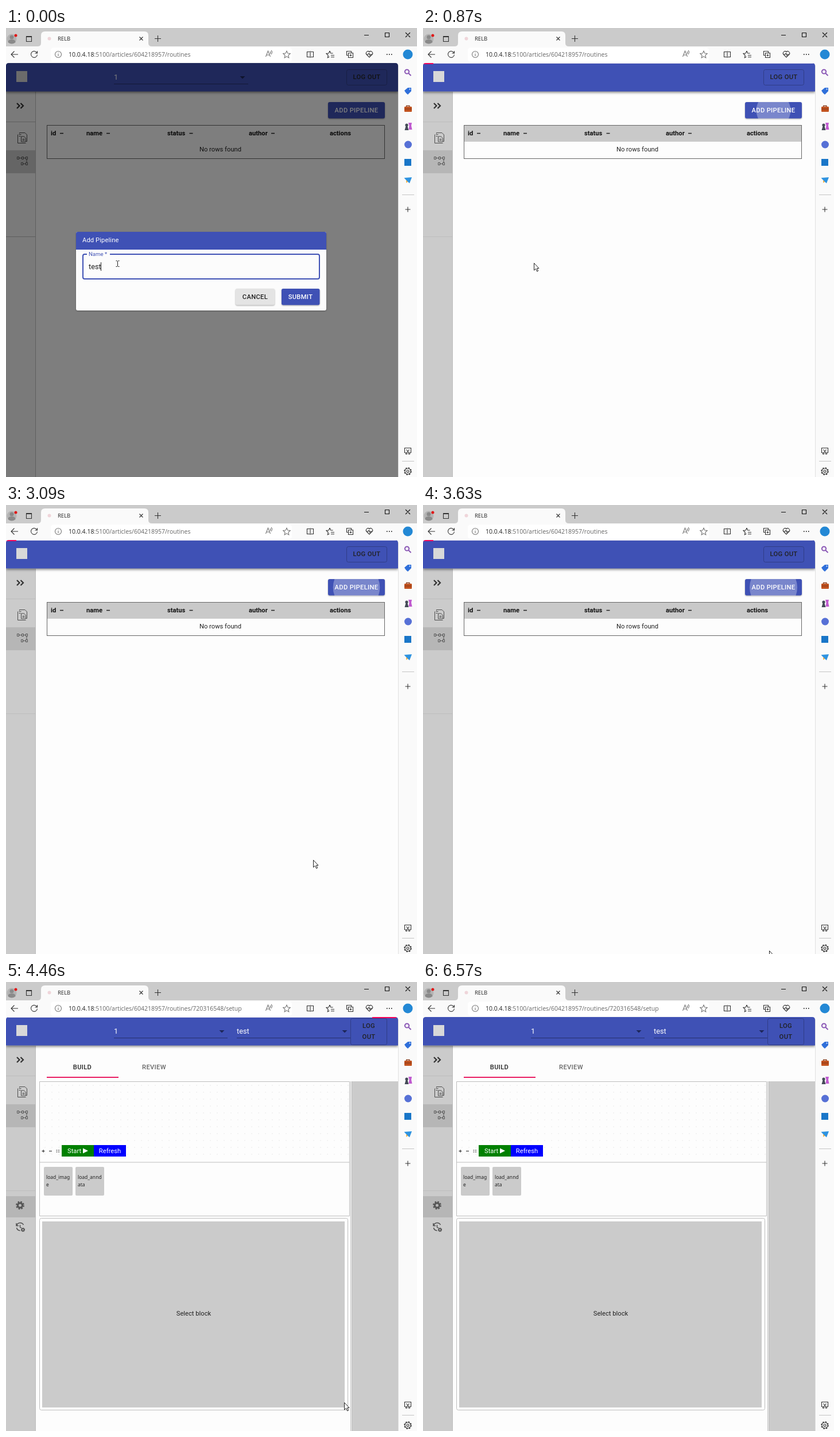
Recreate the animation shown at these times as an HTML page. Size 716x782 px, loop 7.12 s.

```html
<!DOCTYPE html>
<html lang="en">
<head>
<meta charset="utf-8">
<title>Add pipeline</title>
<style>
  html, body { margin: 0; width: 100%; height: 100%; overflow: hidden; background: #fafafa; }
  svg { display: block; }
  text { font: 11.2px Roboto, sans-serif; fill: #212121; white-space: pre; }
  .chrome { font: 10.5px "Open Sans", sans-serif; }
  .button { font-weight: 500; letter-spacing: .32px; }
  .mid { text-anchor: middle; }
  .white { fill: #fff; }
  .head text { font-weight: 700; fill: #111; }
  .field { font-size: 12.8px; }
  .small { font: 8.5px "Noto Sans", sans-serif; }
  .line { fill: none; stroke: #333; stroke-width: 1.1; }
  .rule { fill: none; stroke: #bdbdbd; }
  .raised { filter: drop-shadow(0 1.5px 1.2px #0005); }
</style>
</head>
<body>
<svg width="716" height="782" viewBox="0 0 716 782">
  <defs>
    <g id="gear">
      <circle r="4" fill="none" stroke-width="3"/>
      <circle r="6.2" fill="none" stroke-width="2.4" stroke-dasharray="2.7 2.17"/>
    </g>
    <path id="underline" d="M0 97.5H198" stroke="#26316d"/>
    <path id="arrow" d="M-4.5 -2h9l-4.5 4.5z" fill="#1d2659"/>
    <pattern id="dots" x="62" y="174" width="12" height="12" patternUnits="userSpaceOnUse">
      <rect x="5.5" y="5.5" width="1" height="1" fill="#d2d2d2"/>
    </pattern>
    <clipPath id="addClip"><rect x="561" y="129" width="99" height="29" rx="3"/></clipPath>
    <clipPath id="pageClip"><path d="M0 782V66q0-5 5-5H678q5 0 5 5V782z"/></clipPath>
  </defs>

  <!-- browser frame -->
  <rect width="716" height="782" fill="#fafafa"/>
  <rect width="716" height="32" fill="#cbcbcb"/>
  <path d="M55 32q6 0 6-6V13q0-7 7-7H241q7 0 7 7V26q0 6 6 6z" fill="#fafafa"/>
  <rect x="78" y="34" width="420" height="25" rx="5" fill="#fff"/>
  <path d="M683.5 65V782" stroke="#e0e0e0"/>
  <g fill="#8a8a8a">
    <circle cx="10" cy="19" r="8.5" fill="#b3b3b3"/>
    <circle cx="10" cy="16" r="3.5"/><path d="M3.5 25q0-5 6.5-5t6.5 5q-6.5 5-13 0"/>
    <circle cx="17" cy="13" r="2.5" fill="#e01818"/>
  </g>
  <circle cx="75.5" cy="18.5" r="3" fill="#efd5da"/>
  <text class="chrome" x="90" y="22" style="font-size:9.5px">RELB</text>
  <text class="chrome" x="109" y="50">10.0.4.18<tspan id="path" fill="#666"></tspan></text>
  <g class="line">
    <path d="M35.5 14.5h9v9h-9zM35 15.5h10M232.5 15.5l6 6m0-6l-6 6M259 18.5h11M264.5 13v11"/>
    <path d="M624 12.5h8M660.5 8.5h7v7h-7zM696 8l8 8m0-8l-8 8" stroke="#111"/>
    <path d="M21 46H9M14.5 40.5L9 46l5.5 5.5M54 43.5a5.5 5.5 0 1 0 .5 3M54.5 40v4h-4"/>
    <g stroke="#777"><circle cx="91" cy="46" r="5.5"/><path d="M91 45v4M91 42.5v1"/>
      <path d="M452.5 50l4-10 4 10M454 47h5M460 41q2 2 0 4M462 39q3 3 0 7"/>
      <path d="M489 40l1.8 4 4.4.5-3.3 3 .9 4.3-3.8-2.2-3.8 2.2.9-4.3-3.3-3 4.4-.5z"/></g>
    <path d="M529 41.5h-4.5v9h4.5M531 41.5h4.5v9h-4.5M530 40v12"/>
    <path d="M564 40l1.7 4h4M564 40l-1.8 4-4.2.5 3.2 3-.8 4.2 3-1.7M566 47.5h6M566 50.5h6"/>
    <path d="M601.5 43V40.500h-8v7h2.500M596.500 43.500h8v8h-8zM600.500 45.500v4M598.500 47.500h4"/>
    <path d="M633 51l-4.5-4.5a3 3 0 0 1 4.5-5 3 3 0 0 1 4.5 5zM628 46h3l1.5-2 1.5 4 1-2h3"/>
    <path d="M663 46h1.5M667 46h1.5M671 46h1.5" stroke-width="1.8"/>
  </g>
  <circle cx="700" cy="46" r="8.5" fill="#2388d5"/>

  <!-- browser side bar -->
  <g fill="none" stroke="#8a57b5" stroke-width="2"><circle cx="698.5" cy="76" r="3.6"/><path d="M701.5 79l4 4"/></g>
  <path d="M694 109l6-5h6v6l-6 6q-4-3-6-7z" fill="#2f6fda"/><circle cx="703.5" cy="106.5" r="1" fill="#fff"/>
  <path d="M697.5 138v-2.5h5.5v2.5" fill="none" stroke="#8a3d1c" stroke-width="1.3"/>
  <rect x="694" y="137" width="13" height="9" rx="1" fill="#c1521f"/><path d="M694 141h13" stroke="#7d3012"/>
  <g fill="#444b57"><circle cx="698" cy="169" r="2.6"/><path d="M696.5 171h3l2 7h-7z"/>
    <path d="M701 165h6l-1 5 1.5 7h-6l1-7z" fill="#c05ad0"/></g>
  <circle cx="700.5" cy="203" r="6.5" fill="#5670d6"/>
  <rect x="694" y="228" width="12" height="12" fill="#1976c8"/>
  <path d="M693.500 261l13.500-1-4 10.500-4-3.500z" fill="#2e93e0"/><path d="M697 265l3 2.500-2.500 2.500z" fill="#f0a52c"/>
  <path d="M690 290.5h21M690 754.5h21" stroke="#c4c4c4"/>
  <g class="line">
    <path d="M695.5 316h9M700 311.5v9"/>
    <path d="M696 739.5h-1.5v-8h11v8h-1.5M697.5 734l4.500 6M702.500 734l-4.500 6"/>
    <circle cx="697.5" cy="741" r="1.3"/><circle cx="702.5" cy="741" r="1.3"/>
    <circle cx="700" cy="772" r="5"/><circle cx="700" cy="772" r="2"/>
    <circle cx="700" cy="772" r="6" stroke-width="1.6" stroke-dasharray="2.4 2.31"/>
  </g>

  <g clip-path="url(#pageClip)">
    <rect y="61" width="683" height="721" fill="#fdfdfd"/>
    <!-- navigation -->
    <rect id="nav" y="111" width="51" height="671" fill="#cbcbcb"/>
    <rect id="navItem" y="213" width="51" height="40" fill="#b6b6b6"/>
    <path class="rule" d="M51.5 111V782M0 163.5H51M0 363.5H51" stroke="#b5b5b5"/>
    <g fill="none" stroke="#4d4d4d">
      <path d="M19 131l4.5 4.5-4.5 4.5M25.5 131l4.5 4.5-4.5 4.5" stroke="#333" stroke-width="2.2"/>
      <path d="M23.500 184V182.500h9.500l3.500 3.500v11.500h-1.500M20.500 185.500V200.500h14M22.500 185.500h4M22.500 188.500h3M26.500 198v-9h5l3 3v6zM28.500 193.500h4M28.500 195.500h4"/>
      <path d="M19.5 224.5h3v4h-3zM27.500 224.500h3v4h-3zM34.500 224.5h3v4h-3zM26.5 234.5h3v4h-3zM34.5 234.5h3v4h-3zM22.5 226.5h5M30.5 226.5h4M36 228.5v6M29.5 236.5h5" stroke-width=".9"/>
    </g>

    <!-- header -->
    <rect y="61" width="683" height="49.5" fill="#3f51b5" style="filter:drop-shadow(0 2px 2px #0007)"/>
    <rect x="18" y="75" width="19" height="19" fill="#d8d8d8"/>
    <g id="progress">
      <rect y="61" width="683" height="1" fill="#dcd9ec"/>
      <rect id="bar" y="61" height="2" fill="#f50057"/>
    </g>

    <g id="listPage">
      <g id="wideSelect"><path d="M188 97.5H422" stroke="#26316d"/><use href="#arrow" x="412" y="86"/>
        <text class="field white" x="188" y="90">1</text></g>
      <rect x="593.5" y="72.5" width="70" height="27" rx="3" fill="none" stroke="#303d87"/>
      <text class="button mid" x="628.5" y="89">LOG OUT</text>
      <rect class="raised" x="561" y="129" width="99" height="28.5" rx="3" fill="#3f51b5"/>
      <circle id="ripple" cx="610.5" cy="143.5" fill="#fff" opacity=".3" clip-path="url(#addClip)"/>
      <text class="button mid white" x="610.5" y="147">ADD PIPELINE</text>
      <rect id="tableHead" x="72" y="170" width="587" height="28" fill="#c9c9c9"/>
      <rect x="71.5" y="169.5" width="588" height="58" fill="none" stroke="#666"/>
      <g class="head">
        <text x="78" y="187">id</text><text x="140" y="187">name</text><text x="281" y="187">status</text>
        <text x="423" y="187">author</text><text x="564" y="187">actions</text>
        <path d="M94 183.5h6M175 183.5h6M319.5 183.5h6M462 183.5h6" stroke="#222" stroke-width="1.3"/>
      </g>
      <text class="mid" x="373.5" y="215">No rows found</text>
    </g>

    <g id="buildPage">
      <use href="#underline" x="188"/><use href="#arrow" x="376" y="86"/><text class="field white" x="188" y="90">1</text>
      <use href="#underline" x="402"/><use href="#arrow" x="590" y="86"/><text class="field white" x="402" y="90">test</text>
      <rect x="600.5" y="63.5" width="63" height="46" rx="3" fill="none" stroke="#303d87"/>
      <text class="button mid" x="632" y="80">LOG</text><text class="button mid" x="632" y="98.5">OUT</text>
      <text class="button mid" x="133" y="151.5">BUILD</text>
      <text class="button mid" x="258" y="151.5" style="fill:#666">REVIEW</text>
      <rect x="71" y="165" width="125" height="2" fill="#e91e63"/>
      <rect x="602" y="173" width="81" height="609" fill="#cbcbcb"/>
      <rect x="59" y="174" width="540" height="132" fill="url(#dots)"/>
      <path class="rule" d="M58.5 173.5H598.5V407.5H58.5zM58.5 314H598.5M602.5 173V782M600.5 173V782"/>
      <path d="M62.5 294.5h5M65 292v5M75 294.5h5M87.5 293h2M91 293h2M87.5 296h2M91 296h2" stroke="#222"/>
      <rect x="97" y="284" width="56" height="20" fill="#008000"/><rect x="153" y="284" width="56" height="20" fill="#00f"/>
      <text class="white" x="107" y="297.5">Start</text><path d="M134 289.5v9l9-4.5z" fill="#fff"/>
      <text class="white mid" x="181" y="297.5">Refresh</text>
      <rect x="66" y="322" width="50" height="50" rx="2" fill="#cbcbcb"/><rect x="121" y="322" width="50" height="50" rx="2" fill="#cbcbcb"/>
      <text class="small" x="70" y="343">load_imag<tspan x="70" dy="13">e</tspan></text>
      <text class="small" x="125" y="343">load_annd<tspan x="125" dy="13">ata</tspan></text>
      <rect class="rule" x="58.5" y="411.5" width="537" height="334" rx="3"/>
      <rect x="63" y="417" width="527" height="324" fill="#cbcbcb"/>
      <text class="mid" x="327" y="581">Select block</text>
      <rect y="373" width="51" height="37" fill="#b6b6b6"/>
      <use href="#gear" x="24.5" y="389" stroke="#555"/>
      <g fill="none" stroke="#4d4d4d" stroke-width="1.4"><path d="M18.5 424a6.5 6.5 0 0 1 12-1M18 420v4.5h4M18.5 428a6.5 6.5 0 0 0 6 5M24.5 423v4l2.5 1.5"/>
        <use href="#gear" transform="translate(29.5 431.5) scale(.5)"/></g>
    </g>

    <g id="dialog">
      <rect y="61" width="683" height="721" opacity=".5"/>
      <rect class="raised" x="122" y="355" width="436" height="137" rx="3" fill="#fcfcfc"/>
      <path d="M122 386V358q0-3 3-3H555q3 0 3 3V386z" fill="#3f51b5"/>
      <text class="white" x="133" y="373" letter-spacing=".1">Add Pipeline</text>
      <rect x="134" y="394" width="412" height="43" rx="3" fill="none" stroke="#3f51b5" stroke-width="2"/>
      <rect x="141" y="392" width="40" height="4" fill="#fcfcfc"/>
      <text x="144" y="397" style="font-size:9.6px;fill:#3f51b5">Name *</text>
      <text class="field" x="144" y="420">test</text>
      <rect id="caret" x="165" y="408" width="1" height="15" fill="#222"/>
      <rect class="raised" x="400" y="454" width="68" height="28.5" rx="3" fill="#e4e4e4"/>
      <rect class="raised" x="480" y="454" width="66.5" height="28.5" rx="3" fill="#3f51b5"/>
      <text class="button mid" x="434" y="472">CANCEL</text><text class="button mid white" x="513" y="472">SUBMIT</text>
    </g>

    <path id="beam" d="M191.5 405.5h2l1 1 1-1h2M194.5 406v9M191.5 415.5h2l1-1 1 1h2" fill="none" stroke="#222"/>
    <path id="pointer" d="M.5 .5V13l3-2.7 2.2 4.7 2-1-2.1-4.4H9z" fill="#fff" stroke="#222"/>
  </g>
</svg>
<script>
const LOOP = 7120, OPENED = 870, BUILD = 4460, LOADED = 4890;
const $ = id => document.getElementById(id);
const show = (id, on) => $(id).style.display = on ? '' : 'none';
const set = (id, attrs) => { for (const k in attrs) $(id).setAttribute(k, attrs[k]); };

// Screen refresh times while the button pulses
const ticks = [870, 990, 1260, 1380, 1540, 1690, 1810, 2090, 2240, 2370, 2520, 2670, 2820,
  2970, 3090, 3210, 3330, 3630, 3760, 3900, 4030, 4180, 4310];
// Pointer stops: time, x, y
const stops = [
  [720, 193, 409], [2090, 195, 408], [2240, 198, 350], [2370, 196, 288], [2520, 175, 288],
  [2820, 190, 291], [2970, 360, 452], [3090, 535, 618], [3210, 572, 690], [3330, 586, 720],
  [3490, 598, 739], [3630, 603, 776], [3760, 603, 800], [4460, 589, 732], [4610, 430, 645],
  [4730, 280, 556], [4890, 230, 464], [5040, 200, 410], [5160, 190, 396], [5300, 184, 381],
  [5430, 177, 371], [6010, 300, 520], [6140, 487, 704], [6290, 560, 758], [6410, 600, 780],
  [6570, 600, 800]
];

// cubic-bezier(.4, 0, .2, 1)
function ease(x) {
  let lo = 0, hi = 1;
  for (let i = 0; i < 20; i++) {
    const s = (lo + hi) / 2, q = 1 - s;
    if (1.2 * s * q * q + .6 * s * s * q + s ** 3 < x) lo = s; else hi = s;
  }
  return lo * lo * (3 - 2 * lo);
}

function rippleRadius(t) {
  if (t < 1200) return 30 + (t - OPENED) * .058;
  const phase = (t - 1200) / 1250, e = ease(phase % 1);
  return 41.5 * (1 - .08 * (Math.floor(phase) % 2 ? 1 - e : e));
}

function draw(t) {
  const dialog = t < OPENED, build = t >= BUILD;
  show('dialog', dialog);
  show('wideSelect', dialog);
  show('tableHead', !dialog);
  show('caret', t < 280);
  show('listPage', !build);
  show('buildPage', build);
  set('nav', { fill: dialog ? '#f6f6f6' : '#cbcbcb' });
  set('navItem', { fill: dialog ? '#cbcbcb' : '#b6b6b6' });
  $('path').textContent = ':5100/articles/604218957/routines' + (build ? '/720316548/setup' : '');

  show('ripple', !dialog && !build);
  const tick = ticks.findLast(s => s <= t);
  if (tick) set('ripple', { r: rippleRadius(tick) });

  show('progress', !dialog && t < LOADED);
  const [x, width] = !build ? [0, 18] : t < 4610 ? [638, 42] : [0, 682];
  set('bar', { x, width, opacity: t < 4610 ? 1 : .5 });

  const stop = stops.findLast(s => s[0] <= t);
  show('beam', !stop);
  show('pointer', stop);
  if (stop) set('pointer', { transform: `translate(${stop[1]} ${stop[2]})` });
}

function frame() {
  draw(performance.now() % LOOP);
  requestAnimationFrame(frame);
}
frame();
</script>
</body>
</html>
```
